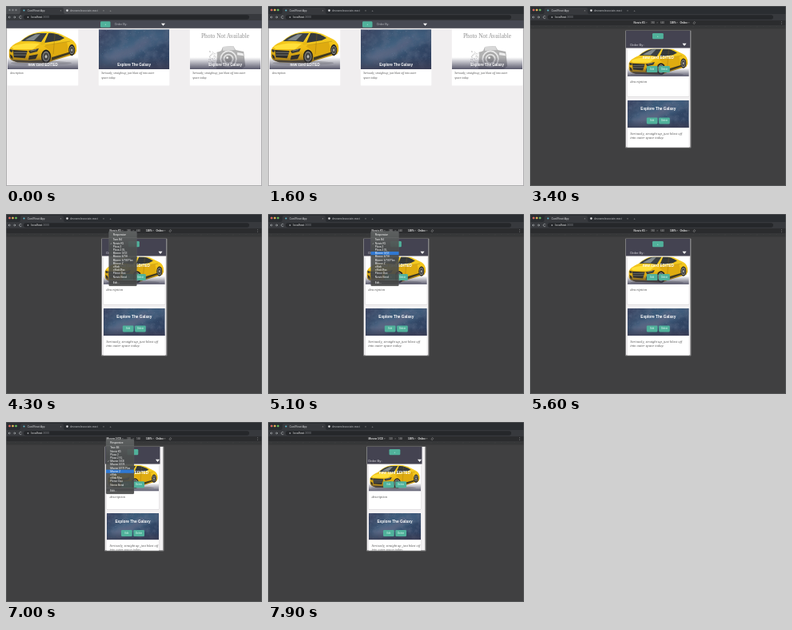
Write an HTML page that moves like this. It is 320x225 px and loops after 8 s.

```html
<!DOCTYPE html>
<html lang="en">
<head>
<meta charset="utf-8">
<title>Responsive cards</title>
<style>
html, body { margin: 0; width: 100%; height: 100%; overflow: hidden; background: #404041; }
#stage { display: block; width: 100vw; height: 100vh; }
text { font-family: "Liberation Sans", Arial, sans-serif; }
.serif { font-family: "Liberation Serif", "Times New Roman", serif; }
.script { font-family: "Liberation Serif", "Times New Roman", serif; font-style: italic; }
</style>
</head>
<body>
<svg id="stage" viewBox="0 0 320 225" preserveAspectRatio="none"></svg>
<script>
const LOOP = 8000;
const GREEN = '#50b19b';
const stage = document.getElementById('stage');

const rect = (x, y, w, h, fill, more = '') =>
  `<rect x="${x}" y="${y}" width="${w}" height="${h}" fill="${fill}" ${more}/>`;
const text = (x, y, size, fill, s, more = '') =>
  `<text x="${x}" y="${y}" font-size="${size}" fill="${fill}" ${more}>${s}</text>`;
const path = (d, fill, more = '') => `<path d="${d}" fill="${fill}" ${more}/>`;
const circle = (x, y, r, fill, more = '') =>
  `<circle cx="${x}" cy="${y}" r="${r}" fill="${fill}" ${more}/>`;
const group = (id, body, more = '') => `<g id="${id}" ${more}>${body}</g>`;
const arrow = (x, y, w, fill = '#fff') =>
  path(`M${x} ${y}h${w}l${-w / 2} ${w * 0.62}z`, fill);
const middle = 'text-anchor="middle"';

function seeded(seed) {
  return () => (seed = (seed * 16807) % 2147483647) / 2147483647;
}

function wheel(x, y, rx, ry) {
  const oval = (k, fill) =>
    `<ellipse cx="${x}" cy="${y}" rx="${rx * k}" ry="${ry * k}" fill="${fill}"/>`;
  return oval(1, '#25241f') + oval(0.74, '#8f8f8a') + oval(0.6, '#494946') + oval(0.22, '#c0c0bc');
}

function car() {
  return rect(0, 0, 88, 50, '#fff') +
    '<ellipse cx="42" cy="42" rx="38" ry="2.5" fill="#cfcfcf"/>' +
    path('M2 26Q4 20 16 15Q26 6 37 4Q52 1 66 6L80 13Q87 17 86 27L84 31L57 39L49 42L12 41Q3 39 2 34Z', 'url(#paint)') +
    path('M17 15Q27 6 38 5L49 5L42 16Q29 14 17 15Z', '#3b4043') +
    path('M51 5Q60 4 71 11L65 14L46 17Z', '#35393a') +
    path('M22 13.5L35 6.5L41 6L33 14Z', '#838b8e') +
    path('M5 22Q18 16 40 18L32 25L8 25Z', '#ffdf39') +
    path('M45 21L74 16L76 28L56 34L52 26Z', '#dfab10') +
    path('M47 20L78 15M59 6L57 31', 'none', 'stroke="#8e6b13" stroke-width=".4"') +
    path('M7 26L25 27L22 36L8 35Z', '#2d2d2b') +
    path('M3 25L7 26L6 29L3 28ZM26 27L39 24L37 28L28 30Z', '#3b3b35') +
    path('M27 33L38 31L35 37L26 38ZM3 31L6 33L7 37L4 36Z', '#33302a') +
    path('M4 38L25 39L47 38L45 42L12 41Z', '#4d4530') +
    path('M55 35L77 28.5L77 31L55 38.5Z', '#3f3820') +
    path('M29 27L36 25.5M8 29H24M8 32H23', 'none', 'stroke="#c5c5bb" stroke-width=".5"') +
    path('M41 17L46 15L47 19L42 20Z', '#e7b916') +
    wheel(48, 34, 6, 8.5) + wheel(80, 26, 4, 7);
}

function galaxy() {
  const rnd = seeded(83);
  let stars = '';
  for (let i = 0; i < 130; i++) {
    const x = (rnd() * 88).toFixed(1), y = (rnd() * 50).toFixed(1);
    stars += circle(x, y, (0.12 + rnd() * 0.26).toFixed(2), i % 4 ? '#7d9cbc' : '#b7bdd0', 'opacity=".65"');
  }
  return rect(0, 0, 88, 50, 'url(#sky)') +
    path('M0 50L13 26L35 19L62 3L88 0V14L61 25L34 37L16 50Z', '#5c82a3', 'opacity=".3" filter="url(#soft)"') +
    path('M4 37L24 26L42 22L60 10L66 15L45 30L20 41Z', '#8d6c82', 'opacity=".3" filter="url(#soft)"') +
    rect(0, 0, 88, 50, '#000', 'filter="url(#dust)" opacity=".5"') + stars;
}

function noPhoto() {
  const rnd = seeded(29);
  let flecks = '';
  for (let i = 0; i < 75; i++) {
    const x = 23 + rnd() * 14, y = 27 + rnd() * 20;
    flecks += rect(x.toFixed(1), y.toFixed(1), 1, 0.8, '#c4c4c4');
  }
  return rect(0, 0, 88, 50, '#fff') +
    text(44, 11.2, 7.4, '#929292', 'Photo Not Available', `class="serif" ${middle}`) +
    flecks +
    path('M34 29L39 27L41 22L54 21L57 26L67 28L69 46L64 50H33Z', '#b2b2b2') +
    path('M41 22L54 21L56 26L41 27Z', '#d8d8d8') +
    path('M59 29L66 30L67 33L59 32Z', '#eee') +
    circle(48, 37, 10.5, '#e9e9e9') + circle(48, 37, 8.8, '#a8a8a8') +
    circle(48, 37, 6.5, '#dedede') + circle(48, 37, 4.5, '#999') + circle(46.5, 35.5, 1.4, '#f4f4f4');
}

function button(x, y, w, h, label) {
  return rect(x, y, w, h, GREEN, 'rx="1.3"') +
    text(x + w / 2, y + h / 2 + 1, 2.8, '#e7fff8', label, middle);
}

// Title positions are measured from the top of the picture.
function card({ x, y, w, photo, h, art, title, titleY, size, lines, lineSize, mobile }) {
  const mid = w / 2;
  const label = text(mid, titleY, size, '#fff', title, `font-weight="bold" ${middle}`);
  const buttons = mobile
    ? button(mid - 14.5, titleY + 9.4, 13.7, 8, 'Edit') + button(mid + 0.8, titleY + 9.4, 13.7, 8, 'Delete')
    : '';
  const body = lines.map((s, i) =>
    text(x + 3.4, y + photo + (mobile ? 8.3 : 6.4) + i * 5.1, lineSize, '#555', s, 'class="script"')).join('');
  const shadow = mobile ? rect(x - 0.3, y + 0.5, w + 0.6, h, '#cfcdcf', 'rx="1"') : '';
  return shadow + rect(x, y, w, h, '#fff', 'rx="1"') +
    `<svg x="${x}" y="${y}" width="${w}" height="${photo}" overflow="hidden">
      <svg width="${w}" height="${photo}" viewBox="0 0 88 50" preserveAspectRatio="xMidYMid slice"><use href="#${art}"/></svg>
      <rect width="${w}" height="${photo}" fill="url(#shade)"/>
      <g class="${mobile ? 'rise' : ''}">${label}${buttons}</g>
    </svg>` + body;
}

function desktop() {
  const base = { y: 29.2, w: 88.5, photo: 49.8, h: 70.3, titleY: 46, size: 4.5, lineSize: 3.65 };
  const blurb = ['Seriously, straight up, just blast off into outer', 'space today.'];
  return rect(0, 18, 320, 207, '#f0eeef') + rect(0, 18, 320, 9.8, '#464852') +
    button(118, 19.3, 12.5, 7.4, '+') +
    text(135.7, 24.2, 3.7, '#b5b6bd', 'Order By:') + arrow(194, 21.7, 5) +
    card({ ...base, x: 1.8, art: 'car', title: 'new card EDITED', lines: ['description'] }) +
    card({ ...base, x: 115.8, art: 'galaxy', title: 'Explore The Galaxy', lines: blurb }) +
    card({ ...base, x: 229.8, art: 'noPhoto', title: 'Explore The Galaxy', lines: blurb });
}

function phone({ x, w, bottom, inset, cardW, photo, cardH, first, second, barW, titleY, plusX, arrowX, lineSize }) {
  const base = { x: x + inset, w: cardW, photo, h: cardH, mobile: true, titleY, size: 4.75, lineSize };
  const h = bottom - 31;
  const clip = `phone${w}`;
  return rect(x - 1, 30.4, w + 2, h + 1.5, '#7c7c7d', 'rx="1"') +
    `<clipPath id="${clip}">${rect(x, 31, w, h, '#000')}</clipPath>` +
    `<g clip-path="url(#${clip})">` +
    rect(x, 31, w, h, '#f3f1f2') + rect(x, 31, barW, 21.5, '#444351') +
    button(plusX, 34, 13.8, 7.3, '+') +
    text(125, 49.6, 4.1, '#d3d2d8', 'Order By:') + arrow(arrowX, 46.8, 5) +
    card({ ...base, y: first, art: 'car', title: 'new card EDITED', lines: ['description'] }) +
    card({ ...base, y: second, art: 'galaxy', title: 'Explore The Galaxy',
      lines: ['Seriously, straight up, just blast off', 'into outer space today.'] }) + '</g>';
}

const devices = ['Responsive', 'Tavo B4', 'Norvix K5', 'Ploxa 2', 'Ploxa 2 XL', 'Mivone 5/CE',
  'Mivone 6/7/8', 'Mivone 6/7/8 Plus', 'Mivone Z', 'oSlab', 'oSlab Max', 'Plenor Duo', 'Norvix Bend', 'Edit…'];
const rowY = i => i === 0 ? 25.7 : i === 13 ? 86.3 : 32.3 + (i - 1) * 4.2;

function menu() {
  return rect(0, 21.5, 35, 68.5, 'url(#glass)', 'rx="1.2" stroke="#69696a" stroke-width=".2"') +
    rect(0, 29.1, 35, 0.35, '#737374') + rect(0, 82.3, 35, 0.35, '#737374') +
    rect(0, 0, 35, 4.2, '#2f78d2', 'id="highlight"') +
    text(1.7, 0, 3, '#fff', '✓', 'id="check"') +
    devices.map((s, i) => text(5.2, rowY(i) + 1.1, 3.15, '#fff', s)).join('');
}

function chrome() {
  const lights = ['#ee6259', '#f2bd4b', '#5fc454'].map((c, i) => circle(4.5 + i * 4, 5, 1.2, c)).join('');
  const line = 'stroke="#c9cbce" stroke-width=".55"';
  return rect(0, 0, 320, 10.3, '#2a2d31', 'id="tabs"') + rect(0, 10, 320, 8, '#37393d') +
    path('M16 10.3Q18 10 18 7V4Q18 2 20 2H70Q72 2 72 4V7Q72 10 74 10.3Z', '#37393d') +
    [4.5, 8.5, 12.5].map(x => circle(x, 5, 1.2, '#7d8084')).join('') + group('lights', lights) +
    circle(22.5, 5.6, 1, '#63c3d6') + text(26.7, 6.7, 3.1, '#d5d7da', 'Card React App') +
    text(67.5, 6.7, 3.4, '#aaa', '×') + circle(76.5, 5.6, 1.3, '#d8d9db') +
    text(80, 6.7, 3.1, '#b9bbbf', 'devname/associate-react') +
    text(121, 6.8, 3.4, '#aaa', '×') + text(129.5, 6.9, 4, '#aaa', '+') +
    rect(22, 11.3, 282, 5.5, '#25272a', 'rx="2.7"') +
    path('M6 14H3M4.3 12.6L3 14L4.3 15.4M9 14H12M10.7 12.6L12 14L10.7 15.4M19.5 13A1.6 1.6 0 1 0 19.5 15', 'none', line) +
    circle(27.5, 14, 0.9, '#999b9e') +
    text(31.5, 15.2, 3.5, '#e6e7e8', 'localhost<tspan fill="#85888c">:3000</tspan>');
}

function deviceBar() {
  let ticks = '';
  for (let x = 4; x < 320; x += 8) ticks += `M${x} 25v${x % 40 === 4 ? 2.2 : 1}`;
  return rect(0, 18, 320, 207, '#404041') + rect(0, 18, 320, 6.3, '#2b2c2e') +
    rect(0, 24.3, 320, 4.2, '#363738') +
    path(ticks, 'none', 'stroke="#4c4d4f" stroke-width=".35"') +
    text(144, 22.1, 3.1, '#e0e0e0', '', 'id="device" text-anchor="end" font-weight="bold"') +
    arrow(145, 20.5, 1.7, '#aaa') +
    text(151, 22.1, 3, '#b8b8b8', '', 'id="width"') + text(158.3, 22.1, 3, '#999', '×') +
    text(163, 22.1, 3, '#b8b8b8', '', 'id="height"') +
    text(175, 22.1, 3, '#eee', '100%', 'font-weight="bold"') + arrow(183.3, 20.5, 1.7, '#aaa') +
    text(187.5, 22.1, 3, '#eee', 'Online', 'font-weight="bold"') + arrow(197.7, 20.5, 1.7, '#aaa') +
    rect(204.5, 19.8, 1.8, 2.5, 'none', 'stroke="#aaa" stroke-width=".4" transform="rotate(35 205.4 21)"') +
    [19.7, 21, 22.3].map(y => circle(314.5, y, 0.35, '#bbb')).join('');
}

const stops = list => list.map(([at, color, alpha = 1]) =>
  `<stop offset="${at}" stop-color="${color}" stop-opacity="${alpha}"/>`).join('');

stage.innerHTML = `<defs>
  <linearGradient id="paint" x2="0" y2="1">${stops([[0, '#f8d42b'], [0.55, '#efbd14'], [1, '#a97c13']])}</linearGradient>
  <linearGradient id="sky" x2="1" y2=".5">${stops([[0, '#3a3f5c'], [0.45, '#3c5b79'], [1, '#2f4160']])}</linearGradient>
  <linearGradient id="shade" x2="0" y2="1">${stops([[0.7, '#3c3c52', 0], [1, '#3c3c52', 0.85]])}</linearGradient>
  <linearGradient id="glass" x2="0" y2="1">${stops([[0, '#606363', 0.95], [0.3, '#4c4f4f', 0.93], [1, '#454646', 0.9]])}</linearGradient>
  <filter id="soft"><feGaussianBlur stdDeviation="3"/></filter>
  <filter id="dust" x="0" y="0" width="1" height="1">
    <feTurbulence type="fractalNoise" baseFrequency=".11" numOctaves="4" seed="4"/>
    <feColorMatrix values="0 0 0 0 .1  0 0 0 0 .14  0 0 0 0 .23  2.6 0 0 0 -.95"/>
  </filter>
  ${group('car', car())}${group('galaxy', galaxy())}${group('noPhoto', noPhoto())}
</defs>` +
  group('desktop', desktop()) +
  group('emulator', deviceBar() +
    group('large', phone({ x: 120, w: 80.5, bottom: 176.6, inset: 1.8, cardW: 77, photo: 34.3, cardH: 59.5, first: 53.6,
      second: 118, barW: 80.5, titleY: 12, plusX: 153, arrowX: 190.5, lineSize: 4.65 })) +
    group('small', phone({ x: 124, w: 72.5, bottom: 160.5, inset: 2, cardW: 65, photo: 33.3, cardH: 56, first: 53.2,
      second: 114, barW: 68.5, titleY: 11.6, plusX: 151.5, arrowX: 187, lineSize: 4.35 })) +
    group('tooltip', rect(177, 32.5, 25, 6.2, '#d6d6d6') +
      text(189.5, 36.8, 3.1, '#444', '360px × 640px', middle)) +
    group('menu', menu())) +
  chrome() +
  rect(0.25, 0.25, 319.5, 224.3, 'none', 'stroke="#6b6d6f" stroke-width=".5"');

const el = id => document.getElementById(id);
const rises = [...document.querySelectorAll('.rise')];
const show = (id, on) => el(id).setAttribute('display', on ? 'inline' : 'none');
const put = (id, attrs) => Object.entries(attrs).forEach(([k, v]) => el(id).setAttribute(k, v));
const progress = (t, from, to) => Math.min(1, Math.max(0, (t - from) / (to - from)));
const ease = p => p * p * (3 - 2 * p);

function draw(t) {
  const emulating = t >= 2300;
  const small = t >= 5700;
  show('desktop', !emulating);
  show('emulator', emulating);
  show('large', !small);
  show('small', small);
  show('tooltip', t >= 2400 && t < 3100);

  const focus = progress(t, 1300, 1600);
  const [r, g, b] = [[76, 42], [78, 45], [82, 49]].map(([from, to]) => Math.round(from + (to - from) * focus));
  put('tabs', { fill: `rgb(${r},${g},${b})` });
  put('lights', { opacity: focus });

  const drop = 11 * (1 - ease(progress(t, 2300, 3050)));
  rises.forEach(node => node.setAttribute('transform', `translate(0 ${drop})`));

  el('device').textContent = devices[small ? 5 : 2];
  el('width').textContent = small ? '320' : '360';
  el('height').textContent = small ? '568' : '640';

  const [opens, closes] = small ? [6200, 7600] : [3700, 5400];
  const opacity = 1 - progress(t, closes, closes + 200);
  show('menu', t >= opens && opacity > 0);
  put('menu', { opacity, transform: `translate(${small ? 125 : 128.5} 0)` });
  const row = small
    ? Math.round(5 + 3 * progress(t, 6400, 6900))
    : Math.round(2 + 3 * progress(t, 4450, 4850));
  show('highlight', t >= (small ? 6300 : 4450));
  put('highlight', { y: rowY(row) - 2.1 });
  put('check', { y: rowY(small ? 5 : 2) + 1.1 });
}

const start = performance.now();
function tick() {
  draw((performance.now() - start) % LOOP);
  requestAnimationFrame(tick);
}
draw(0);
requestAnimationFrame(tick);
</script>
</body>
</html>
```
